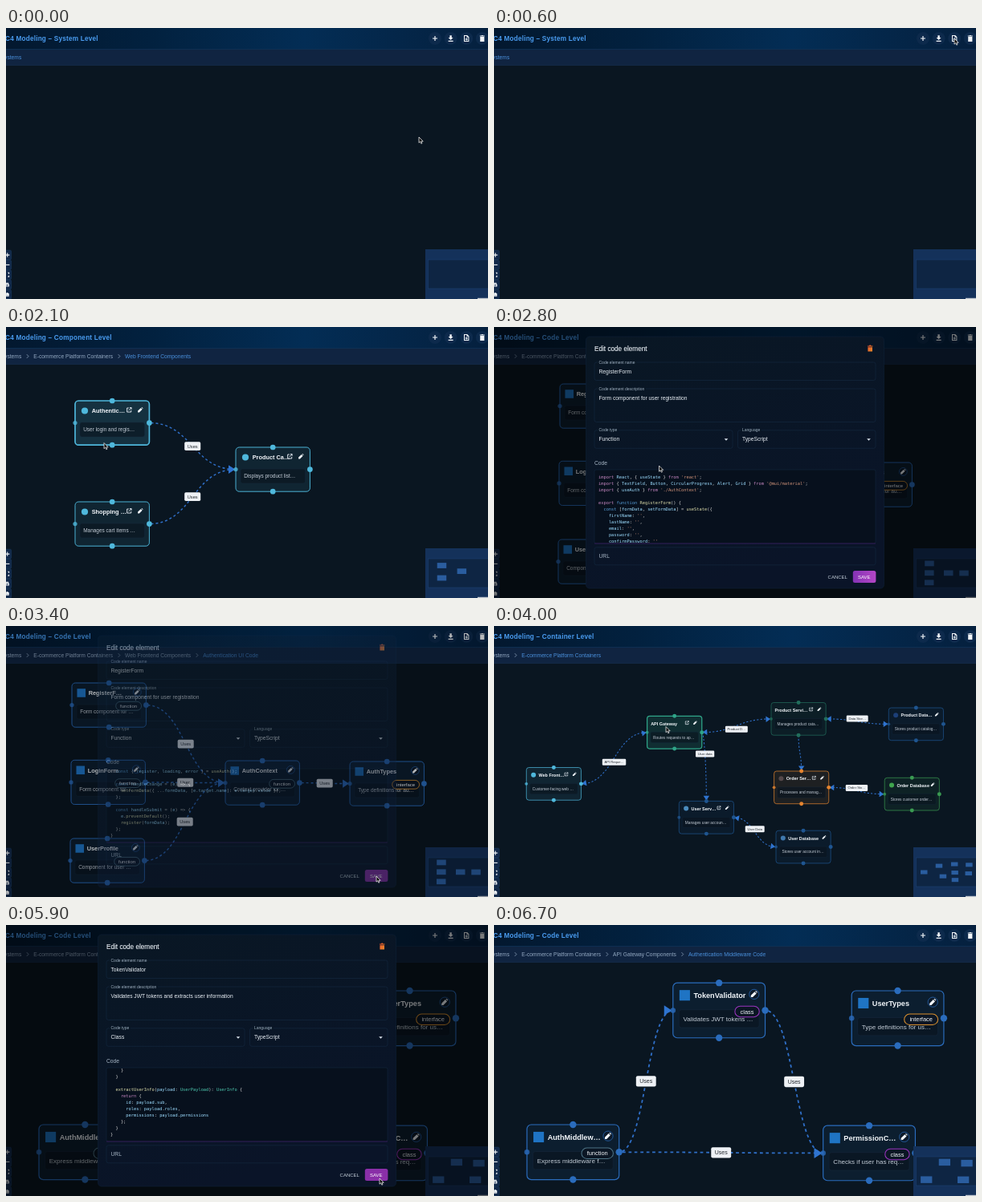
Animation of 600x338 px, one loop 6800 ms. Source, as an HTML page:

```html
<!DOCTYPE html>
<html lang="en">
<head>
<meta charset="utf-8">
<title>C4 Modeling</title>
<style>
html, body { margin: 0; width: 100%; height: 100%; overflow: hidden; background: #0a1621; }
svg { display: block; width: 600px; height: 338px; font-family: "Liberation Sans", Arial, sans-serif; }
.code { font-family: "DejaVu Sans Mono", "Liberation Mono", monospace; font-size: 5.35px; white-space: pre; }
.edge { fill: none; stroke: #2f6fc8; stroke-dashoffset: var(--flow); }
</style>
</head>
<body>
<svg id="stage" viewBox="0 0 600 338">
  <defs>
    <linearGradient id="head">
      <stop offset="0" stop-color="#03182f"/><stop offset=".3" stop-color="#02213f"/>
      <stop offset=".62" stop-color="#032d55"/><stop offset="1" stop-color="#05203e"/>
    </linearGradient>
    <linearGradient id="panel" x2=".4" y2="1">
      <stop offset="0" stop-color="#091724"/><stop offset="1" stop-color="#0a1428"/>
    </linearGradient>
    <linearGradient id="save">
      <stop offset="0" stop-color="#8433b4"/><stop offset="1" stop-color="#b446c6"/>
    </linearGradient>
    <linearGradient id="bin" x2="1" y2="1">
      <stop offset="0" stop-color="#f0532d"/><stop offset="1" stop-color="#e08a2a"/>
    </linearGradient>
    <clipPath id="editor"><rect x="125" y="178.5" width="350" height="91"/></clipPath>
  </defs>
</svg>
<script>
const LOOP = 6800, STEP = 100;
const BLUE = '#2a6cbd', CYAN = '#4fb8dc', GREEN = '#3a9a52', TEAL = '#2fa588',
      PINE = '#226e5c', ORANGE = '#e58530', PURPLE = '#5a45d0', NAVY = '#1f5590',
      MAGENTA = '#9b35c0', SLATE = '#4d7385', TS = '#1f74c4';
const svg = document.getElementById('stage');

function el(tag, attrs, parent, text) {
  const node = document.createElementNS('http://www.w3.org/2000/svg', tag);
  for (const key in attrs) node.setAttribute(key, attrs[key]);
  if (text !== undefined) node.textContent = text;
  parent.appendChild(node);
  return node;
}
const group = (parent, attrs = {}) => el('g', attrs, parent);
const rect = (p, x, y, width, height, fill, more) => el('rect', { x, y, width, height, fill, ...more }, p);
const dot = (p, cx, cy, r, fill, more) => el('circle', { cx, cy, r, fill, ...more }, p);
const path = (p, d, more) => el('path', { d, ...more }, p);
const label = (p, x, y, size, fill, str, more) =>
  el('text', { x, y, 'font-size': size, fill, ...more }, p, str);
const line = (stroke, width) => ({ fill: 'none', stroke, 'stroke-width': width });

// Text centred on a rounded box sized from the text itself
function chip(p, str, size, ink, boxAt, style) {
  const text = label(p, 0, 0, size, ink, str);
  const w = text.getComputedTextLength();
  const b = boxAt(w);
  text.setAttribute('x', b.x + (b.w - w) / 2);
  text.setAttribute('y', b.y + b.h / 2 + size * .35);
  p.insertBefore(rect(p, b.x, b.y, b.w, b.h, style.fill, style), text);
}

/* ---- diagram ---- */
const PENCIL = 'M-2.4 2.4V.9L.7-2.2 2.2-.7-.9 2.4ZM1.2-2.6 1.8-3 3-1.8 2.6-1.2Z';
const OPEN = 'M-.3-2.1H-2.1V2.1H2.1V.3M.6-2.4H2.4V-.6M2.4-2.4L-.5.5';
const W = 77, H = 46;
const PORTS = { l: [0, H / 2, -1, 0], r: [W, H / 2, 1, 0], t: [W / 2, 0, 0, -1], b: [W / 2, H, 0, 1] };

function drawNode(p, n, s) {
  const g = group(p, { transform: `translate(${n.x} ${n.y}) scale(${s})` });
  const c = n.color || BLUE;
  const frame = rect(g, 0, 0, W, H, c, { rx: 3.6, stroke: c, 'fill-opacity': .09 });
  rect(g, 5, 22.5, 67, 15, '#0a1420', { rx: 2, 'fill-opacity': .65, stroke: '#16283c', 'stroke-width': .4 });
  if (n.square) rect(g, 5.4, 6, 8.8, 8.8, n.square);
  if (n.round) dot(g, 10, 10.4, 3.4, n.round);
  label(g, n.square || n.round ? 17.2 : 5.2, 12.8, 6.15, '#f2f6fa', n.name, { 'font-weight': 700 });
  label(g, 8.5, 31.9, 5.4, '#c3ccd6', n.text);
  if (n.open) path(g, OPEN, { ...line('#e4ebf2', .8), transform: 'translate(56 9.6)' });
  if (n.kind) dot(g, 67.8, 9.5, 4.1, '#0c1a2a', { stroke: c, 'stroke-width': .5 });
  path(g, PENCIL, { fill: '#f2f6fa', transform: 'translate(67.5 9.6)' });
  if (n.kind) {
    const tone = { class: MAGENTA, interface: '#d9902f', function: SLATE }[n.kind];
    chip(g, n.kind, 5, '#f2f6fa', w => ({ x: 72.1 - w - 9, y: 19.5, w: w + 9, h: 9 }),
      { fill: '#0b1624', rx: 4.5, stroke: tone, 'stroke-width': .7 });
  }
  for (const k in PORTS) dot(g, PORTS[k][0], PORTS[k][1], k === 'l' ? 2.2 : 2.8, c, { opacity: k === 'l' ? .8 : 1 });
  return { x: n.x, y: n.y, w: W * s, h: H * s, frame };
}

function arrow(p, x, y, dx, dy, s) {
  const a = Math.atan2(dy, dx) * 180 / Math.PI;
  path(p, 'M-1-0L-7.4-4.2V4.2Z', { fill: '#2f74d0', transform: `translate(${x} ${y}) rotate(${a}) scale(${s})` });
}

function drawEdge(p, nodes, [from, out, to, into, str, lift = 0, both], s) {
  const end = (n, k) => [n.x + PORTS[k][0] * s, n.y + PORTS[k][1] * s];
  const [x1, y1] = end(nodes[from], out), [x2, y2] = end(nodes[to], into);
  const bend = (x, y, k) => [x + PORTS[k][2] * Math.abs(x2 - x1) / 2, y + PORTS[k][3] * Math.abs(y2 - y1) / 2];
  const [ax, ay] = bend(x1, y1, out), [bx, by] = bend(x2, y2, into);
  const at = t => {
    const u = 1 - t, mix = (a, b, c, d) => u * u * u * a + 3 * u * u * t * b + 3 * u * t * t * c + t * t * t * d;
    return [mix(x1, ax, bx, x2), mix(y1, ay, by, y2)];
  };
  path(p, `M${x1} ${y1}C${ax} ${ay} ${bx} ${by} ${x2} ${y2}`,
    { class: 'edge', 'stroke-width': 1.2 * s, 'stroke-dasharray': `${2.5 * s} ${2.5 * s}` });
  const near = both ? at(.88) : [bx, by];
  arrow(p, x2, y2, x2 - near[0], y2 - near[1], s);
  if (both) {
    const q = at(.12);
    arrow(p, x1, y1, x1 - q[0], y1 - q[1], s);
  }
  if (!str) return;
  const [mx, my] = at(.5), h = 9 * s;
  chip(p, str, 4.7 * s, '#23282e', w => ({ x: mx - w / 2 - 3 * s, y: my + lift - h / 2, w: w + 6 * s, h }),
    { fill: '#eef1f5', rx: 1.4 * s });
}

function drawScene({ level, crumbs, scale: s = 1, nodes = [], edges = [] }) {
  const g = group(svg);
  label(g, -1, 16, 8.2, '#4a9cf0', `C4 Modeling – ${level} Level`, { 'font-weight': 700, 'letter-spacing': .22 });
  let x = -6.4;
  crumbs.forEach((str, i) => {
    const last = i === crumbs.length - 1;
    const text = label(g, x, 38.8, 6.7, last ? '#4a90dc' : '#93a9c2', str);
    x += text.getComputedTextLength() + 15;
    if (!last) path(g, `M${x - 8.4} 34.2l2.2 2.3-2.2 2.3`, line('#7f95ae', .9));
  });
  edges.forEach(e => drawEdge(g, nodes, e, s));
  const boxes = nodes.map(n => drawNode(g, n, s));
  rect(g, 522, 276, 78, 62, '#14315a');
  rect(g, 525.5, 289, 75, 36, '#0e2543', { stroke: '#1c4273', 'stroke-width': .5 });
  boxes.forEach(b => rect(g, 526 + b.x * .1245, 282.8 + b.y * .123, b.w * .1245, b.h * .123, '#2a5d9f'));
  rect(g, 587, 336.8, 13, 1.2, '#c8ced6');
  return { g, boxes };
}

const node = (x, y, name, text, more) => ({ x, y, name, text, ...more });
const containers = ['Systems', 'E-commerce Platform Containers'];
const front = [...containers, 'Web Frontend Components'];
const gateway = [...containers, 'API Gateway Components'];

const scenes = {};
function buildScenes() {
  scenes.empty = drawScene({ level: 'System', crumbs: ['Systems'] });
  scenes.systems = drawScene({
    level: 'System', crumbs: ['Systems'],
    nodes: [
      node(16.5, 141.8, 'CRM System', 'Customer relationship …', { open: 1 }),
      node(180.8, 91.2, 'E-commer…', 'Main online sales syst…', { open: 1, color: ORANGE, round: ORANGE }),
      node(296.3, 159.3, 'Payment S…', 'Handles all financial tr…', { open: 1, color: PURPLE, round: '#5b55e0' }),
      node(506.2, 166.5, 'Banking Syst…', 'Interface with financial…', { open: 1 }),
      node(182.6, 254, 'Logistics …', 'Manages shipments a…', { open: 1, round: '#2f8fd0' })
    ],
    edges: [[0, 'r', 1, 'l', 'Customer …', 5, 1], [1, 'r', 2, 'l', 'Payment …', 5, 1],
      [1, 'b', 4, 't', 'Order Ma…', 0], [2, 'r', 3, 'l', 'Banking T…', -4, 1]]
  });
  scenes.containers = drawScene({
    level: 'Container', crumbs: containers, scale: .885,
    nodes: [
      node(40.3, 176.5, 'Web Front…', 'Customer-facing web …', { open: 1, color: CYAN, round: CYAN }),
      node(190.6, 112.3, 'API Gateway', 'Routes requests to ap…', { open: 1, color: TEAL }),
      node(345, 95.5, 'Product Servi…', 'Manages product cata…', { open: 1, color: PINE }),
      node(491.3, 102, 'Product Data…', 'Stores product catalog…', { color: NAVY, round: '#1c3f78' }),
      node(348.6, 181, 'Order Ser…', 'Processes and manag…', { open: 1, color: ORANGE, round: '#54484a' }),
      node(486.2, 189.3, 'Order Database', 'Stores customer order…', { color: GREEN, round: '#3fa64e' }),
      node(230.3, 218.4, 'User Serv…', 'Manages user accoun…', { open: 1, color: NAVY, round: '#4b8bbd' }),
      node(351, 255.2, 'User Database', 'Stores user account in…', { color: NAVY, round: '#3f78ad' })
    ],
    edges: [[0, 'r', 1, 'l', 'API Reque…', 5, 1], [1, 'r', 2, 'l', 'Product D…', 4.5, 1],
      [2, 'r', 3, 'l', 'Data Stor…', -3.5, 1], [2, 'b', 4, 't'], [4, 'r', 5, 'l', 'Order Sto…', -3.5, 1],
      [1, 'r', 6, 't', 'User data'], [6, 'r', 7, 'l', 'User Data', -4, 1]]
  });
  scenes.frontParts = drawScene({
    level: 'Component', crumbs: front, scale: 1.2,
    nodes: [
      node(86, 92, 'Authentic…', 'User login and regis…', { open: 1, color: CYAN, round: CYAN }),
      node(286, 150, 'Product Ca…', 'Displays product list…', { open: 1, color: CYAN, round: CYAN }),
      node(86, 218, 'Shopping …', 'Manages cart items …', { open: 1, color: CYAN, round: CYAN })
    ],
    edges: [[0, 'r', 1, 'l', 'Uses'], [2, 'r', 1, 'l', 'Uses']]
  });
  scenes.formCode = drawScene({
    level: 'Code', crumbs: [...front, 'Authentication UI Code'], scale: 1.2,
    nodes: [
      node(82, 71, 'RegisterF…', 'Form component for …', { square: TS, kind: 'function' }),
      node(81, 167.3, 'LoginForm', 'Form component for …', { square: TS, kind: 'function' }),
      node(80, 265, 'UserProfile', 'Component for user …', { square: TS, kind: 'function' }),
      node(273, 168, 'AuthContext', 'Context provider for …', { square: TS, kind: 'function' }),
      node(428, 169, 'AuthTypes', 'Type definitions for au…', { square: TS, kind: 'interface' })
    ],
    edges: [[0, 'r', 3, 'l', 'Uses'], [1, 'r', 3, 'l', 'Uses'], [2, 'r', 3, 'l', 'Uses'], [3, 'r', 4, 'l', 'Uses']]
  });
  scenes.gatewayParts = drawScene({
    level: 'Component', crumbs: gateway, scale: 1.2,
    nodes: [
      node(92, 150, 'Request Ro…', 'Routes API requests …', { open: 1, color: TEAL }),
      node(292, 92, 'Authentic…', 'Validates user tokens…', { open: 1, color: TEAL, square: TS }),
      node(292, 218, 'Rate Limiter', 'Controls request rate…', { open: 1, color: TEAL })
    ],
    edges: [[0, 'r', 1, 'l', 'Uses'], [0, 'r', 2, 'l', 'Uses']]
  });
  scenes.tokenCode = drawScene({
    level: 'Code', crumbs: [...gateway, 'Authentication Middleware Code'], scale: 1.49,
    nodes: [
      node(222.8, 72.2, 'TokenValidator', 'Validates JWT tokens …', { square: TS, kind: 'class' }),
      node(445.2, 82, 'UserTypes', 'Type definitions for us…', { square: TS, kind: 'interface' }),
      node(41, 249, 'AuthMiddlew…', 'Express middleware f…', { square: TS, kind: 'function' }),
      node(409.7, 250.2, 'PermissionC…', 'Checks if user has req…', { square: TS, kind: 'class' })
    ],
    edges: [[2, 'r', 0, 'l', 'Uses'], [0, 'r', 3, 'l', 'Uses'], [2, 'r', 3, 'l', 'Uses']]
  });
}

/* ---- frame around the diagram ---- */
function drawBars() {
  rect(svg, 0, 0, 600, 338, '#0a1621');
  rect(svg, 0, 0, 600, 26.5, 'url(#head)');
  rect(svg, 0, 26.5, 600, 20, '#102441');
  rect(svg, 0, 26, 600, .6, '#123a63');
  rect(svg, 0, 46.2, 600, .6, '#173152');
  const icons = ['M-3-.6H-.6V-3H.6V-.6H3V.6H.6V3H-.6V.6H-3Z',
    'M-1.2-3.8H1.2V-1H3L0 2-3-1H-1.2ZM-3 2.8H3V4H-3Z',
    'M-3.2-4H1L3.2-1.8V4H-3.2ZM-2.2-3V3H2.2V-1.2H.3V-3ZM-.5-.6H.5V.5H1.6V1.4H.5V2.5H-.5V1.4H-1.6V.5H-.5Z',
    'M-3-3.4H-1.2L-.7-4H.7L1.2-3.4H3V-2.5H-3ZM-2.6-1.9H2.6V4H-2.6Z'];
  icons.forEach((d, i) => {
    const x = 534 + i * 19.6;
    dot(svg, x, 13, 8, '#0d2a4c');
    path(svg, d, { fill: '#f4f7fa', 'fill-rule': 'evenodd', transform: `translate(${x} 13)` });
  });
}
function drawControls() {
  const icons = ['M-2 0H3.4M.7-2.7V2.7', 'M-2 0H3.4', 'M-1-2.4H-2V-1M1.4-2.4H2.6V-1M2.6 1V2.4H1.4M-2 1V2.4H-1',
    'M-1.2 0H2.4V2H-1.2ZM-.4 0V-1.8H1.6V0', 'M-1-1.6V1.8H2.2V-1.2M.2-2.2V1M1.2-2V1'];
  icons.forEach((d, i) => {
    const y = 277.2 + i * 12.3;
    rect(svg, -6, y, 12.6, 11.7, '#12294a', { rx: 1.5, stroke: '#1d4068', 'stroke-width': .5 });
    path(svg, d, { ...line('#f0f4f8', 1.1), transform: `translate(1 ${y + 5.9})` });
  });
}

/* ---- dialog ---- */
const TOKENS = /('[^']*')|\b(import|from|export|return|if|throw|try|catch)\b|\b(function|const|class|private|new|this|null)\b|(\w+(?=\())|((?:UserPayload|UserInfo|TokenValidator)\b)|(\w+)|(\s+|[^\w\s']+)/g;
const INKS = ['#ce9178', '#c586c0', '#569cd6', '#dcdcaa', '#4ec9b0', '#9cdcfe', '#d4d4d4'];

function field(p, x, y, w, h, name, value, size = 6.7) {
  rect(p, x, y, w, h, 'none', { rx: 2.5, stroke: '#14283e', 'stroke-width': .7 });
  if (name) {
    const text = label(p, x + 5.5, y + 1.6, 5, '#9fb0c2', name);
    p.insertBefore(rect(p, x + 4, y - 1, text.getComputedTextLength() + 3, 2, '#091724'), text);
  }
  label(p, x + 5.5, y + (h > 30 ? 13.8 : 13.6), size, name ? '#eaf0f6' : '#a9b7c6', value);
}

function drawDialog({ name, text, kind, code }) {
  const g = group(svg);
  rect(g, 0, 0, 600, 338, '#000', { opacity: .5 });
  rect(g, 114.5, 12, 371, 314, 'url(#panel)', { rx: 4.5, stroke: '#0f2136', 'stroke-width': .6 });
  label(g, 125, 29.5, 8.2, '#eaf0f6', 'Edit code element', { stroke: '#eaf0f6', 'stroke-width': .12 });
  path(g, 'M465-0H467l.6-.8h1.2l.6.8H471.4V1.2H465ZM465.4 1.8H471V7.2H465.4Z', { fill: 'url(#bin)', transform: 'translate(0 23.4)' });
  field(g, 125, 44, 350, 22.5, 'Code element name', name);
  field(g, 125, 77, 350, 41.5, 'Code element description', text);
  field(g, 125, 128.8, 172, 22.5, 'Code type', kind);
  field(g, 303.5, 128.8, 171.5, 22.5, 'Language', 'TypeScript');
  for (const x of [289, 466.5]) path(g, `M${x - 2.3} 139.3h4.6l-2.3 2.4Z`, { fill: '#dde5ee' });
  label(g, 125, 172.3, 6.7, '#a9b7c6', 'Code');
  rect(g, 125, 178, 350, 92, '#07101d', { rx: 2, stroke: '#14283e', 'stroke-width': .6 });
  const body = group(group(g, { 'clip-path': 'url(#editor)' }));
  code.forEach((str, i) => {
    const row = el('text', { x: 130, y: 189 + i * 8, class: 'code' }, body);
    for (const m of str.matchAll(TOKENS)) el('tspan', { fill: INKS[m.slice(1).findIndex(v => v !== undefined)] }, row, m[0]);
  });
  rect(g, 125, 269.6, 350, .8, '#3a1a5c');
  field(g, 125, 274.8, 350, 22, '', 'URL');
  label(g, 415.6, 313.7, 6, '#c9d3de', 'CANCEL');
  const save = rect(g, 446.8, 304, 28.6, 15, 'url(#save)', { rx: 2.5 });
  label(g, 453, 313.7, 6, '#fff', 'SAVE');
  return { g, body, save, max: code.length * 8 - 82 };
}

const formCode = `import React, { useState } from 'react';
import { TextField, Button, CircularProgress, Alert, Grid } from '@mui/material';
import { useAuth } from './AuthContext';

export function RegisterForm() {
  const [formData, setFormData] = useState({
    firstName: '',
    lastName: '',
    email: '',
    password: '',
    confirmPassword: ''
  });
  const { register, loading, error } = useAuth();

  const handleChange = (e) => {
    setFormData({ ...formData, [e.target.name]: e.target.value });
  };

  const handleSubmit = (e) => {
    e.preventDefault();
    register(formData);
  };
}`.split('\n');

const tokenCode = `import jwt from 'jsonwebtoken';
import { UserPayload, UserInfo } from './UserTypes';

export class TokenValidator {
  private secret: string;

  constructor(secret: string) {
    this.secret = secret;
  }

  validate(token: string): UserPayload {
    try {
      return jwt.verify(token, this.secret);
    } catch (error) {
      return null;
    }
  }

  extractUserInfo(payload: UserPayload): UserInfo {
    return {
      id: payload.sub,
      roles: payload.roles,
      permissions: payload.permissions
    };
  }
}`.split('\n');

drawBars();
buildScenes();
drawControls();
const dialogs = [
  { ...drawDialog({ name: 'RegisterForm', text: 'Form component for user registration', kind: 'Function', code: formCode }),
    from: 2600, to: 3500, scroll: [2800, 3100] },
  { ...drawDialog({ name: 'TokenValidator', text: 'Validates JWT tokens and extracts user information', kind: 'Class', code: tokenCode }),
    from: 5100, to: 6200, scroll: [5300, 5700] }
];
const cursor = path(svg, 'M0 0V7.2L1.7 5.7 2.8 8.2 4 7.7 2.9 5.3H5.2Z', { fill: '#111', stroke: '#fff', 'stroke-width': .7 });

/* ---- motion ---- */
const CUTS = [[0, 'empty'], [700, 'systems'], [1500, 'containers'], [2000, 'frontParts'], [2300, 'formCode'],
  [3700, 'containers'], [4300, 'gatewayParts'], [4600, 'tokenCode']];
const TRAIL = [[0, 514, 136], [300, 573, 13], [600, 573, 13], [1200, 212, 105], [1400, 237, 101], [1500, 237, 101],
  [1800, 91, 185], [2000, 91, 185], [2200, 153, 104], [2300, 153, 104], [2500, 163, 83], [2600, 163, 83],
  [2800, 205.5, 173], [3100, 210, 190], [3300, 461, 312], [3400, 461, 312], [3600, 84, 37], [3700, 84, 37],
  [4000, 214, 125.5], [4200, 240, 121], [4300, 240, 121], [4500, 359, 104], [4600, 359, 104], [4800, 281.5, 73],
  [5000, 324, 87], [5100, 324, 87], [5300, 280, 220], [5700, 284, 224], [5900, 465, 316], [6100, 465, 316], [6400, 520, 345]];

const clamp = v => Math.max(0, Math.min(1, v));
const ease = v => v * v * (3 - 2 * v);

function cursorAt(t) {
  const i = TRAIL.findIndex(k => k[0] > t);
  if (i < 0) return TRAIL[TRAIL.length - 1].slice(1);
  const [t0, x0, y0] = TRAIL[i - 1], [t1, x1, y1] = TRAIL[i];
  const k = ease((t - t0) / (t1 - t0));
  return [x0 + (x1 - x0) * k, y0 + (y1 - y0) * k];
}

function render(t) {
  const current = scenes[CUTS.filter(c => c[0] <= t).pop()[1]];
  const [cx, cy] = cursorAt(t);
  let modal = false;
  for (const d of dialogs) {
    const shown = clamp(Math.min((t - d.from + STEP) / 200, (d.to - t) / 200));
    modal = modal || shown > 0;
    d.g.style.display = shown ? '' : 'none';
    d.g.style.opacity = shown;
    const k = ease(clamp((t - d.scroll[0]) / (d.scroll[1] - d.scroll[0])));
    d.body.setAttribute('transform', `translate(0 ${-d.max * k})`);
    d.save.setAttribute('fill', cx > 447 && cy > 304 ? '#8a2fa8' : 'url(#save)');
  }
  for (const s of Object.values(scenes)) s.g.style.display = s === current ? '' : 'none';
  for (const b of current.boxes) {
    const hot = !modal && cx > b.x && cx < b.x + b.w && cy > b.y && cy < b.y + b.h;
    b.frame.setAttribute('stroke-width', hot ? 1.4 : .8);
    b.frame.setAttribute('fill-opacity', hot ? .17 : .09);
  }
  svg.style.setProperty('--flow', -(t % 500) / 50 + 'px');
  cursor.setAttribute('transform', `translate(${cx} ${cy})`);
}

const start = performance.now();
function tick() {
  const t = (performance.now() - start) % LOOP;
  render(Math.floor(t / STEP) * STEP);
  requestAnimationFrame(tick);
}
tick();
</script>
</body>
</html>
```
